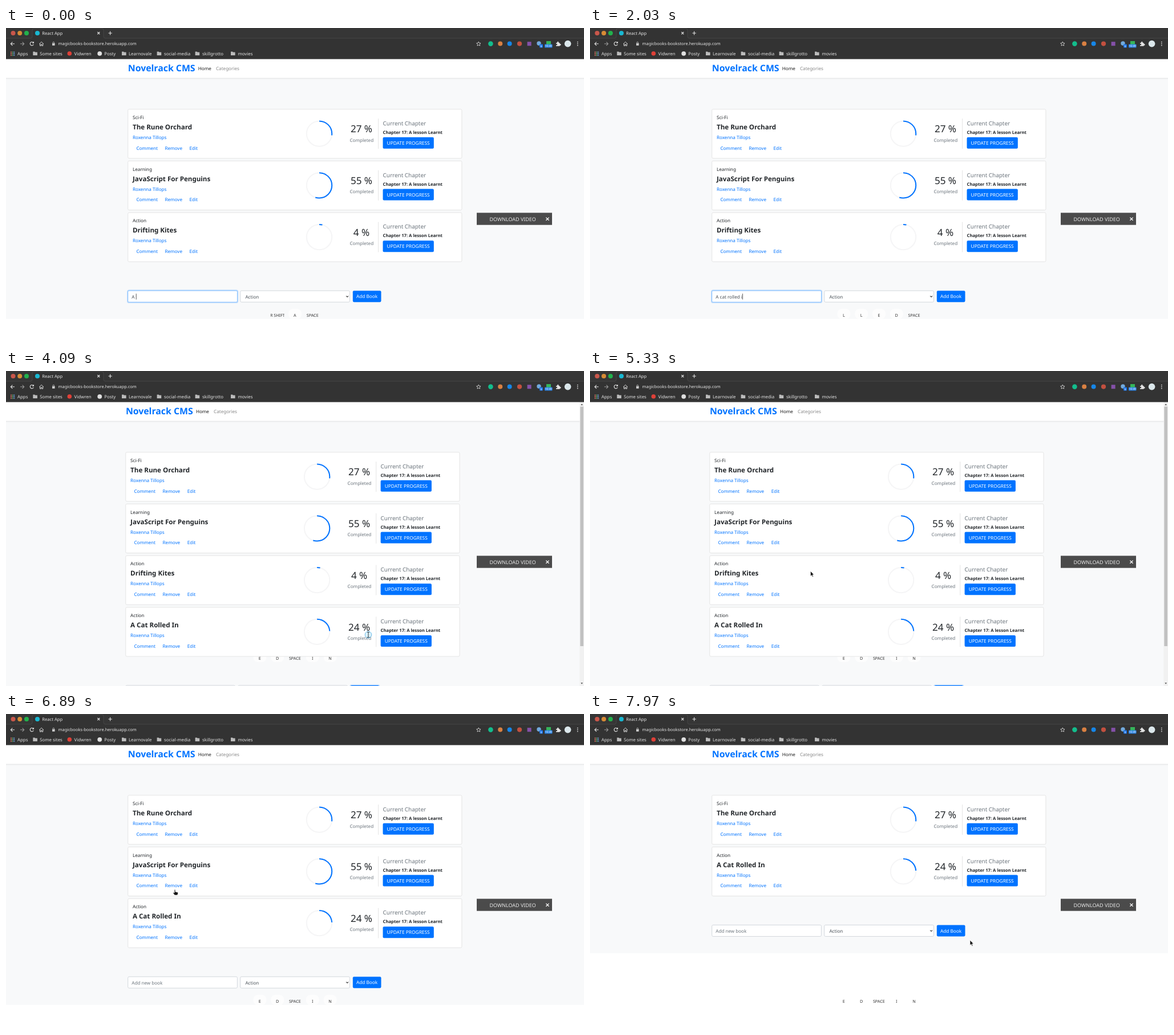
These frames come from a looping animation (1013 px wide and 553 px high, 8 s). An HTML page:

```html
<!DOCTYPE html>
<html lang="en">
<head>
<meta charset="utf-8">
<title>Book list</title>
<style>
html, body { margin: 0; width: 100%; height: 100%; overflow: hidden; background: #fff; }
svg { font-family: "Noto Sans", sans-serif; }
#stage { display: block; width: 100vw; height: 100vh; }
text { white-space: pre; text-rendering: geometricPrecision; }
</style>
</head>
<body>
<svg id="stage" viewBox="0 0 1013 553">
  <g id="page"></g>
  <g id="browser"></g>
  <g id="overlay"></g>
</svg>
<script>
const LOOP = 8000, PITCH = 90.75, BLUE = '#0073ff', INK = '#212529', GREY = '#6c757d';
const BODY = 8.07;

const text = (x, y, size, fill, value, extra = '') =>
  `<text x="${x}" y="${y}" font-size="${size}" fill="${fill}" ${extra}>${value}</text>`;
const rect = (x, y, w, h, fill, extra = '') =>
  `<rect x="${x}" y="${y}" width="${w}" height="${h}" fill="${fill}" ${extra}/>`;
const circle = (x, y, r, fill, extra = '') =>
  `<circle cx="${x}" cy="${y}" r="${r}" fill="${fill}" ${extra}/>`;
const line = (d, stroke, width = 1, extra = '') =>
  `<path d="${d}" fill="none" stroke="${stroke}" stroke-width="${width}" ${extra}/>`;
const BOLD = 'font-weight="700"', MIDDLE = 'text-anchor="middle"';

const books = {
  orchard: ['Sci-Fi', 'The Rune Orchard', 27],
  script: ['Learning', 'JavaScript For Penguins', 55],
  kites: ['Action', 'Drifting Kites', 4],
  cat: ['Action', 'A Cat Rolled In', 24],
};

// [time of the letter, letter, time its key label appears]
const typing = [
  [160, 'c', 160], [300, 'a', 360], [590, 't', 590], [750, ' ', 750],
  [950, 'r', 950], [1050, 'o', 1050], [1180, 'l', 1260], [1400, 'l', 1400],
  [1610, 'e', 1610], [1720, 'd', 1720], [1880, ' ', 1880], [2030, 'i', 2130], [2180, 'n', 2240],
];

const mouse = [
  [3380, 633, 470], [3610, 634, 468], [3880, 635, 463], [4150, 635, 463], [4710, 458, 422],
  [5000, 425, 380], [5330, 387, 351], [5490, 299, 377], [5600, 292, 394], [6250, 292, 394],
  [6890, 296, 308], [7080, 296, 306], [7130, 296, 304], [7360, 296, 304], [7970, 666, 397],
];

const measure = document.createElement('canvas').getContext('2d');
function textWidth(value) {
  measure.font = `${BODY}px "Noto Sans", sans-serif`;
  return measure.measureText(value).width;
}

function listAt(t) {
  if (t < 3880) return ['orchard', 'script', 'kites'];
  if (t < 6250) return ['orchard', 'script', 'kites', 'cat'];
  return t < 7330 ? ['orchard', 'script', 'cat'] : ['orchard', 'cat'];
}

function removeState(t, slot) {
  if (slot === 2 && t >= 5600 && t < 6250) return { fill: Math.min(1, (t - 5560) / 180), ring: t >= 6100 };
  if (slot === 1 && t >= 7000 && t < 7420) return { fill: 1, ring: t >= 7130 && t < 7330 };
  return { fill: 0, ring: false };
}

function card(key, slot, t) {
  const [category, title, percent] = books[key];
  const { fill, ring } = removeState(t, slot);
  const ringAt = 'cx="549" cy="43" r="22.2" fill="none" stroke-width="2"';
  return `<g transform="translate(0 ${142.6 + slot * PITCH})">` +
    rect(213.7, 0, 585.2, 86.2, '#fff', 'rx="2.1" stroke="#dfdfdf" stroke-width=".8"') +
    text(222, 17.2, 8.15, INK, category) +
    text(222, 35.2, 11.58, INK, title, BOLD) +
    text(222, 52.4, BODY, BLUE, 'Roxenna Tillops') +
    text(228.4, 71, BODY, BLUE, 'Comment') +
    (fill ? rect(272.2, 58.2, 43, 19.6, BLUE, `rx="2" opacity="${fill}"` +
      (ring ? ' stroke="#80bdff" stroke-width="1.4"' : '')) : '') +
    text(278.5, 71, BODY, fill > .4 ? '#fff' : BLUE, 'Remove') +
    text(321.6, 71, BODY, BLUE, 'Edit') +
    `<circle ${ringAt} stroke="#f5f5f6"/>` +
    `<circle ${ringAt} stroke="${BLUE}" pathLength="100" stroke-dasharray="${percent} 100" transform="rotate(-90 549 43)"/>` +
    text(623, 40.9, 17, INK, percent + ' %', MIDDLE) +
    text(623.3, 57, 8.1, GREY, 'Completed', MIDDLE) +
    line('M652.6 16.5V69.5', '#dcdcdc', .8) +
    text(660.5, 28.4, 9.94, GREY, 'Current Chapter') +
    text(660.5, 43.2, 7.66, INK, 'Chapter 17: A lesson Learnt', BOLD) +
    rect(660.5, 49.2, 89.3, 20, BLUE, 'rx="2.1"') +
    text(705.1, 62.2, 8.36, '#fff', 'UPDATE PROGRESS', MIDDLE) + '</g>';
}

function form(t, count) {
  const editing = t < 3880;
  const value = 'A ' + typing.filter(([at]) => at <= t).map(k => k[1]).join('');
  const caretOn = t < 2790 || t >= 3380;
  const hover = t >= 3500 && t < 3880;
  const glow = (x, w) => rect(x - .8, -.8, w + 1.6, 21.8, 'none', 'rx="2.8" stroke="#007bff" stroke-opacity=".25" stroke-width="1.8"');
  return `<g transform="translate(0 ${461.2 + (count - 3) * PITCH})">` +
    (editing ? glow(213.7, 191.7) : '') +
    rect(213.7, 0, 191.7, 20, '#fff', `rx="2.1" stroke="${editing ? '#80bdff' : '#ced4da'}" stroke-width=".9"`) +
    (editing
      ? text(220.3, 13.4, BODY, '#495057', value) +
        (caretOn ? rect(220.5 + textWidth(value), 5.2, .8, 10.2, '#333') : '')
      : text(220.3, 13.4, BODY, GREY, 'Add new book')) +
    rect(410.7, 0, 191.7, 20, '#fff', 'rx="2.1" stroke="#ced4da" stroke-width=".9"') +
    text(419.4, 13.4, BODY, '#495057', 'Action') +
    line('M596.2 9.2l1.9 1.9l1.9 -1.9', '#333', 1.1) +
    (t >= 3880 && t < 6100 ? glow(607.8, 49.7) : '') +
    rect(607.8, 0, 49.7, 20, hover ? '#0064dc' : BLUE, 'rx="2.1"') +
    text(632.6, 13.2, 8.2, '#fff', 'Add Book', MIDDLE) + '</g>';
}

function keyLabels(t) {
  const pressed = typing.filter(k => k[2] <= t).map(k => k[1] === ' ' ? 'SPACE' : k[1].toUpperCase());
  const keys = ['R SHIFT', 'A', 'SPACE', ...pressed].slice(-5);
  return keys.map((label, i) => ({ label, x: 506.5 + (i - (keys.length - 1) / 2) * 30.8 }));
}

function page(t, keys) {
  const list = listAt(t), scrolls = list.length > 3;
  const bottom = Math.min(553, 510.7 + (list.length - 3) * PITCH);
  const pills = keys.filter(k => k.label.length === 1)
    .map(k => rect(k.x - 11.5, 493, 23, 18, '#fff', 'rx="8" opacity=".65"')).join('');
  return rect(0, 54, 1013, bottom - 54, '#f8f9fa') + pills +
    rect(0, 54, 1013, 33.6, '#fff') +
    rect(0, 87.6, 1013, 1, '#000', 'opacity=".075"') + rect(0, 88.6, 1013, 1.6, '#000', 'opacity=".03"') +
    `<g transform="translate(${scrolls ? -3.9 : 0} 0)">` +
    text(213.8, 75.6, 15.83, BLUE, 'Novelrack CMS', BOLD) +
    text(336.8, 74.4, 8.1, '#1a1a1a', 'Home') + text(368, 74.4, 8.1, '#888', 'Categories') +
    list.map((key, i) => card(key, i, t)).join('') + form(t, list.length) + '</g>' +
    (scrolls ? rect(1005.4, 54.5, 7.6, 498.5, '#f1f1f1') + rect(1006.4, 62.5, 5.6, 420.5, '#c1c1c1') +
      '<path d="M1007.4 60l1.8 -2.4l1.8 2.4zM1007.4 547.3l1.8 2.4l1.8 -2.4z" fill="#505050"/>' : '');
}

function mouseAt(t) {
  const next = mouse.findIndex(([at]) => at > t);
  if (next < 0) return mouse[mouse.length - 1].slice(1);
  const [t0, x0, y0] = mouse[next - 1], [t1, x1, y1] = mouse[next];
  const k = (t - t0) / (t1 - t0);
  return [x0 + (x1 - x0) * k, y0 + (y1 - y0) * k];
}

function pointer(t) {
  if (t < 3380) return '';
  const [x, y] = mouseAt(t);
  const clicked = (t >= 3610 && t < 4200) || (t >= 6000 && t < 6250) || (t >= 7130 && t < 7330);
  const beam = t >= 3880 && t < 4200;
  const hand = t < 3880 || (t >= 5560 && t < 6330) || (t >= 6850 && t < 7430);
  const outline = 'stroke="#fff" stroke-width=".7" stroke-linejoin="round"';
  const shape = beam
    ? line('M-2 -4.5h1.4l.6 .6l.6 -.6h1.4M0 -4V4M-2 4.5h1.4l.6 -.6l.6 .6h1.4', '#222', .9)
    : hand
      ? `<path d="M-.9 .7Q0 -.7 .9 .7V4L4.8 5Q5.7 5.4 5.5 6.7L4.6 10H-.5L-3.2 6.2Q-3 4.8 -1.7 5.5L-.9 6.2Z" fill="#111" ${outline}/>`
      : `<path d="M0 0V9L2.1 7.2L3.6 10.4L5 9.7L3.6 6.6H6.3Z" fill="#111" ${outline}/>`;
  return `<g transform="translate(${x.toFixed(1)} ${y.toFixed(1)})">` +
    (clicked ? circle(0, 0, 5.8, '#5cc3f2', 'fill-opacity=".22" stroke="#62b6e6" stroke-width=".9"') : '') +
    shape + '</g>';
}

function overlay(t, keys) {
  const labels = keys.map(({ label, x }) => `<svg x="${x - 12.2}" y="495" width="24.2" height="16">` +
    (label.length > 5 ? text(-.8 + .2, 11.6, 7.2, '#333', label) : text(12.1, 11.6, 7.2, '#333', label, MIDDLE)) + '</svg>');
  return labels.join('') +
    rect(825, 324.4, 132, 21.3, '#4b4b4b') +
    text(847.5, 338.5, 8.95, '#e8e8e8', 'DOWNLOAD VIDEO', 'font-weight="300"') +
    line('M946.4 332.6l5.2 5.2M951.6 332.6l-5.2 5.2', '#fff', 1.3) + pointer(t);
}

function browser() {
  const light = '#e4e4e4';
  const folder = x => `<path d="M${x} 41.6h3l1 1h3.6v5.4h-7.6z" fill="#bcbcbc"/>`;
  const mark = (x, label) => text(x, 47.6, 7.85, '#e2e2e2', label);
  const dots = Array.from({ length: 9 }, (_, i) =>
    rect(8 + i % 3 * 2.7, 41.5 + Math.floor(i / 3) * 2.7, 1.8, 1.8, ['#dd6b5d', '#65ad6b', '#6a9de0'][i % 3])).join('');
  return rect(0, 0, 1013, 54.6, '#333') + rect(0, 0, 1013, 18, '#363636') +
    '<path d="M43 18Q46 18 46 15V4Q46 1 49 1H168Q171 1 171 4V15Q171 18 174 18Z" fill="#333"/>' +
    line('M0 18H43Q46 18 46 15V4Q46 1 49 1H168Q171 1 171 4V15Q171 18 174 18H1013', '#535353', .6) +
    circle(12.5, 9, 4, '#c9574b') + circle(24.2, 9, 4, '#d88b35') + circle(36, 9, 4, '#22b14c') +
    circle(55, 9, 4, '#19b8d2') + text(63.2, 11.7, 7.65, light, 'React App') +
    line('M160.3 7l4 4M164.3 7l-4 4M179.4 9h6.4M182.6 5.8v6.4', light, 1.1) +
    line('M15 27.7H8.4M11.4 24.6l-3.1 3.1l3.1 3.1', light, 1.1) +
    line('M25 27.7h6.6M28.6 24.6l3.1 3.1l-3.1 3.1', '#999', 1.1) +
    line('M48 26a3.1 3.1 0 1 0 .3 2.6M48.4 24v2.3h-2.3', light, 1.1) +
    line('M58.3 28l3.8 -3.7l3.8 3.7M59.5 27.2v4h1.8v-2.4h1.6v2.4h1.8v-4', light, .9) +
    rect(81, 26.7, 4.6, 4, '#ccc', 'rx=".5"') + line('M82 27v-1.3a1.3 1.3 0 0 1 2.6 0V27', '#ccc', .8) +
    text(91.6, 30.4, 7.44, light, 'magicbooks-bookstore.herokuapp.com') +
    line('M828.3 24l1.1 2.4l2.6 .3l-1.9 1.8l.5 2.6l-2.3 -1.3l-2.3 1.3l.5 -2.6l-1.9 -1.8l2.6 -.3z', light, .8) +
    circle(849.4, 27.6, 4.3, '#13bd8c') + circle(866.2, 27.6, 4, '#d98042') + circle(882.6, 27.6, 4, '#1686e8') +
    circle(900, 27.6, 4.1, '#c2503f') + rect(913.6, 24.2, 7, 7, '#8450a8') + circle(934, 27, 3.7, '#72a9dc') +
    rect(935, 28.5, 6, 6, '#1a73e8', 'rx="1"') + text(938, 33.6, 5, '#fff', '9', MIDDLE) +
    rect(947, 23, 8, 6, '#35b45a') + rect(944, 28.5, 13.5, 6, '#2f86e6', 'rx="1"') +
    text(950.8, 33.4, 4.6, '#fff', '10:49', MIDDLE) +
    `<path d="M964 26h2.1a1.4 1.4 0 1 1 2.4 0h2v2a1.4 1.4 0 1 1 0 2.4v1.4h-6.5v-2a1.3 1.3 0 1 0 0 -2z" fill="${light}"/>` +
    circle(984.6, 27.6, 5.8, '#dbe7eb') +
    [24.6, 27.6, 30.6].map(y => circle(1001.8, y, .9, light)).join('') +
    dots + mark(20, 'Apps') + [47.3, 203, 264.6, 331.6, 394].map(folder).join('') +
    mark(59.2, 'Some sites') + circle(111.3, 44.8, 3.8, '#df4038') + mark(119.5, 'Vidwren') +
    circle(164.2, 44.8, 3.9, '#e0e0e0') + mark(172.2, 'Posty') + mark(215, 'Learnovale') +
    mark(277, 'social-media') + mark(344, 'skillgrotto') + mark(406.4, 'movies');
}

const drawn = {};
function show(id, markup) {
  if (drawn[id] === markup) return;
  drawn[id] = markup;
  document.getElementById(id).innerHTML = markup;
}

function frame() {
  const t = performance.now() % LOOP, keys = keyLabels(t);
  show('page', page(t, keys));
  show('overlay', overlay(t, keys));
  requestAnimationFrame(frame);
}

show('browser', browser());
frame();
</script>
</body>
</html>
```
